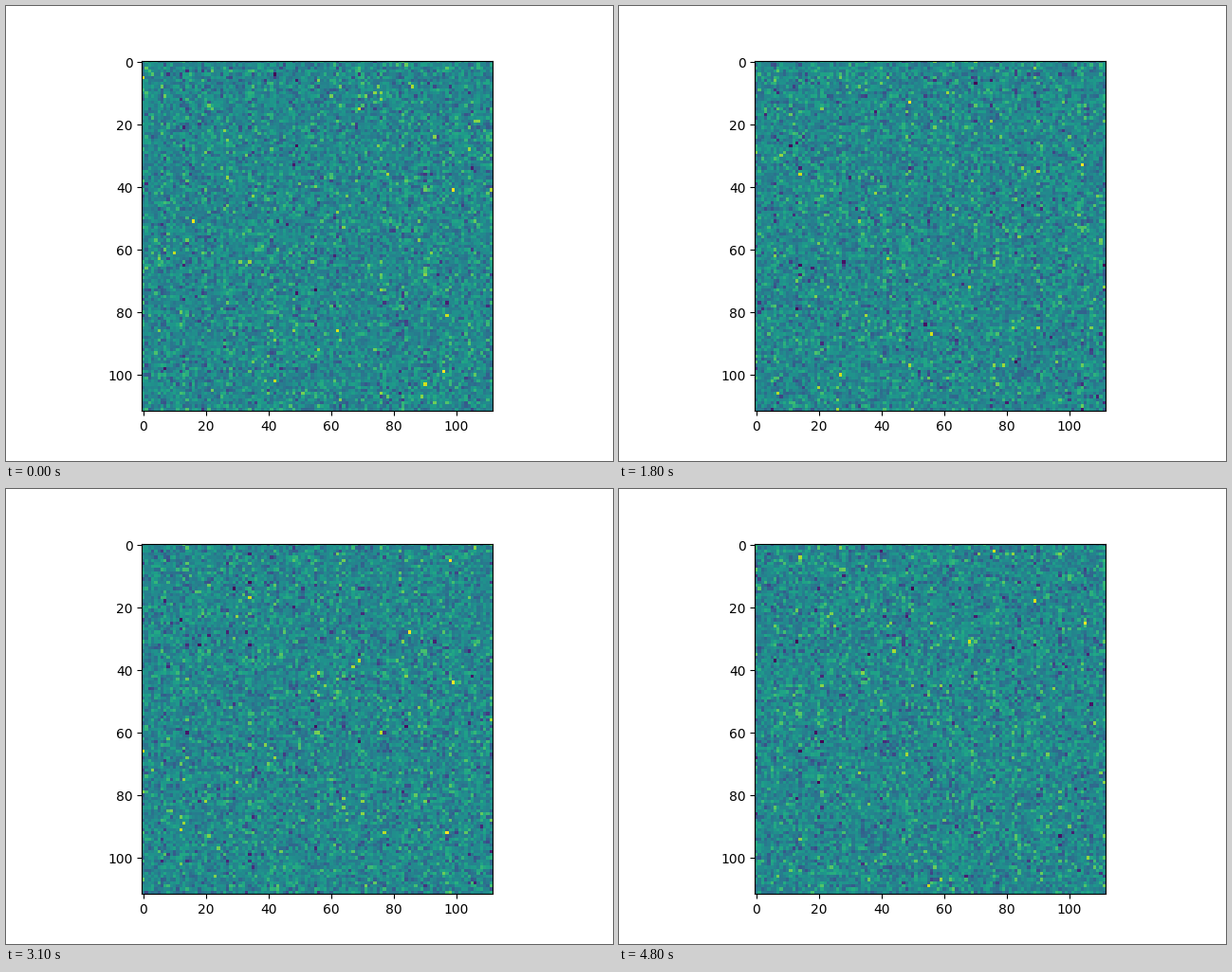
Recreate the animation shown at these times as a matplotlib script. Size 640 by 480 pixels, loop 4.9 s.

```python
import numpy as np
import matplotlib.pyplot as plt
from matplotlib.animation import FuncAnimation

SIZE = 112
STEPS = 49
STEP_MS = 100
MEAN = 0.47

# Noise is strongest in every seventh column
columns = np.arange(SIZE)
spread = 0.076 + 0.032 * np.cos(np.pi * (columns - 6.3) / 7) ** 4


def noise(step):
    # Student's t: a quiet field with a few isolated bright and dark cells
    rng = np.random.default_rng(1000 + step)
    return MEAN + spread * rng.standard_t(9, (SIZE, SIZE))


fig, ax = plt.subplots(figsize=(6.4, 4.8), dpi=100)
image = ax.imshow(noise(0), cmap="viridis", vmin=0, vmax=1,
                  interpolation="nearest")


def update(step):
    image.set_data(noise(step))
    return [image]


anim = FuncAnimation(fig, update, frames=STEPS, interval=STEP_MS,
                     repeat=True, repeat_delay=0)
plt.show()
```
